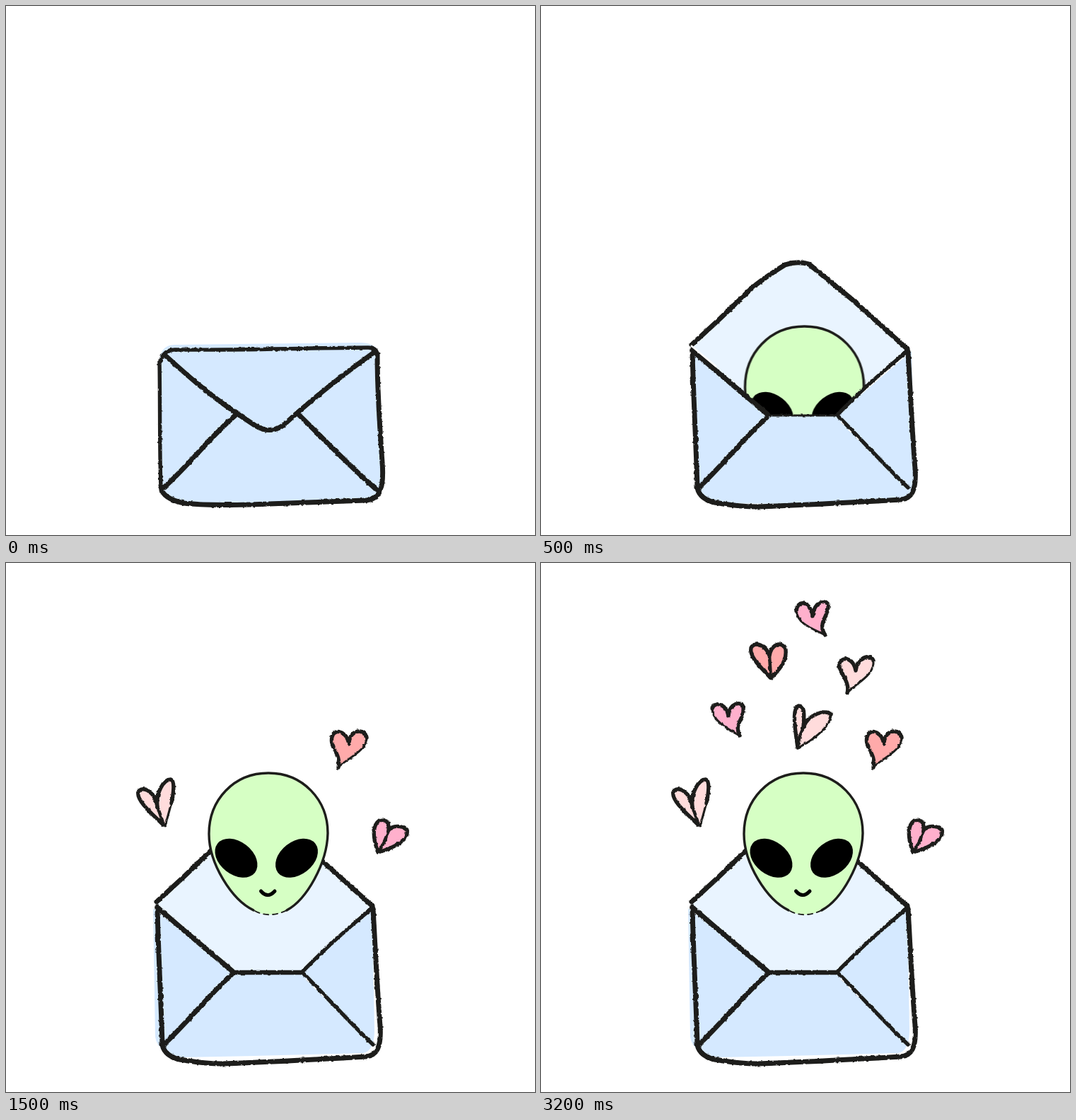
These frames come from a looping animation (748x748 px, 4 s). An HTML page:

```html
<!DOCTYPE html>
<html lang="en">
<head>
<meta charset="utf-8">
<title>Alien mail</title>
<style>
  html, body { margin: 0; width: 100%; height: 100%; overflow: hidden; background: #fff; }
  svg { display: block; width: 100vw; height: 100vh; }

  .ink, .outline { fill: none; stroke: #1d1d1b; stroke-width: 7; stroke-linecap: round; stroke-linejoin: round; }
  .ink { filter: url(#rough); }
  .outline { stroke-width: 3.4; }
  .mid { stroke-width: 5.4; }
  .paper { fill: #d5e9ff; }
  .inside { fill: #e9f4ff; }
  .skin { fill: #d6ffc4; }
  .chip { fill: none; stroke: #fff; }
  .rose { fill: #ffb0cc; }
  .coral { fill: #ffaaaa; }
  .blush { fill: #ffdcdc; }

  .closed, .open, .early, .late, .first, .rest, .alien, .lip { animation: 4s step-end infinite; }
  .closed { animation-name: closed; }
  .open { animation-name: open; }
  .early { animation-name: early; }
  .late, .first { animation-name: late; }
  .rest { animation-name: rest; }
  .alien { animation-name: rise; }
  .lip { animation-name: lip; }

  @keyframes closed { 0% { opacity: 1 } 12.5%, 100% { opacity: 0 } }
  @keyframes open { 0% { opacity: 0 } 12.5%, 100% { opacity: 1 } }
  @keyframes early { 0% { opacity: 1 } 37.5%, 100% { opacity: 0 } }
  @keyframes late { 0% { opacity: 0 } 37.5%, 100% { opacity: 1 } }
  @keyframes rest { 0% { opacity: 0 } 50%, 100% { opacity: 1 } }
  @keyframes rise {
    0% { transform: translate(1.5px, 156px) }
    25% { transform: translate(2.5px, 66px) }
    37.5%, 100% { transform: translate(0, 0) }
  }
  @keyframes lip { 0% { stroke-width: 3 } 25%, 100% { stroke-width: 6.5 } }
</style>
</head>
<body>
<svg viewBox="0 0 748 748">
  <defs>
    <filter id="rough" filterUnits="userSpaceOnUse" x="0" y="0" width="748" height="748" color-interpolation-filters="sRGB">
      <feTurbulence type="fractalNoise" baseFrequency=".2" numOctaves="2" seed="4"/>
      <feDisplacementMap in="SourceGraphic" scale="3" xChannelSelector="R" yChannelSelector="G"/>
    </filter>
    <clipPath id="mouth">
      <path d="M0 0H748V486H519L418 579H320L211 483H0Z"/>
    </clipPath>
  </defs>

  <g class="closed">
    <path class="paper" d="M217 502Q218 480 238 479L500 476Q520 476 525 487L531 672Q528 697 505 699L350 704L250 702Q224 692 221 680Z"/>
    <g class="ink">
      <path class="mid" d="M219 502Q222 487 238 486C330 487 400 484 512 483Q525 483 525 494"/>
      <path d="M525 492C525 540 528 590 532 645C535 684 528 698 508 699C430 702 380 704 345 705C310 706 270 705 252 703C232 699 221 691 219 681"/>
      <path class="mid" d="M217 502C218 560 217 630 219 681"/>
      <path d="M225 494C255 521 285 548 325 575L352 593Q373 606 392 593L412 575C450 542 485 515 520 490"/>
      <path d="M324 579C286 612 256 652 223 681M413 577C447 610 485 650 524 684"/>
    </g>
  </g>

  <g class="open">
    <path class="inside" d="M211 481L300 397L345 365Q362 360 380 365L519 486L418 579H320Z"/>
    <path class="ink" d="M213 479L250 445L300 397Q325 378 345 366Q362 360 379 365L402 384L440 415L518 485"/>

    <g clip-path="url(#mouth)">
      <g class="alien">
        <path class="skin" d="M371 297C420 297 455 335 455 382C454 425 425 476 395 492Q372 503 350 491C319 476 287 425 287 383C287 335 322 297 371 297Z"/>
        <g class="outline">
          <path d="M350 491C319 476 287 425 287 383C287 335 322 297 371 297C420 297 455 335 455 382C454 425 425 476 397 491"/>
          <path stroke-width="1.8" stroke-dasharray="7 6" d="M352 492Q372 503 397 491"/>
        </g>
        <ellipse rx="33.5" ry="23.2" transform="translate(325.5 417.3) rotate(38)"/>
        <ellipse rx="33.5" ry="23.2" transform="translate(411 417.3) rotate(-38)"/>
        <path d="M360.5 464Q370 475 380 464" fill="none" stroke="#000" stroke-width="5" stroke-linecap="round"/>
      </g>
    </g>

    <path class="paper early" d="M216 488L320 579H418L524 488L528 660Q530 695 508 698L350 704L255 703Q222 693 221 680Z"/>
    <path class="paper late" d="M208 488L320 579H418L518 487L521 660Q521 690 505 693L350 697L250 699Q215 695 211 670Z"/>

    <g class="ink">
      <path d="M214 486C215 545 219 610 221 681C223 692 233 701 252 703C270 706 285 708 305 708C370 706 440 702 508 698C524 697 531 685 529 655C524 590 522 540 519 489"/>
      <path d="M214 487L250 518L320 577"/>
      <path class="lip" d="M320 579H418"/>
      <path class="mid" d="M518 488C485 515 452 544 420 577"/>
      <path d="M319 582C285 613 256 650 223 681"/>
      <path class="mid" d="M421 581C452 612 486 650 519 681"/>
    </g>
    <path class="chip early" stroke-width="2.5" d="M212 480L248 510"/>
    <path class="chip" stroke-width="1.5" stroke-dasharray="6 9" d="M424 588L455 619"/>
  </g>

  <g class="first">
    <path class="blush" d="M224 372C208 356 184 336 187 324C192 314 210 322 214 344C212 326 222 306 233 306C243 310 234 348 224 372Z"/>
    <path class="coral" d="M469 290C474 268 457 262 461 246C464 234 480 236 485 247C490 234 508 234 510 247C510 266 482 276 469 290Z"/>
    <path class="rose" d="M526 409C520 392 516 372 528 364C538 361 542 368 541 378C546 371 560 370 567 378C570 390 552 402 526 409Z"/>
    <g class="ink mid">
      <path d="M222 370C208 356 184 336 187 324C192 314 210 322 214 344C212 326 222 306 233 306C239 308 237 325 234 339"/>
      <path stroke-width="3" d="M234 339L225 372"/>
      <path stroke-width="4.5" d="M214 344L223 370"/>
      <path d="M470 289C474 268 457 262 461 246C464 234 480 236 485 255C486 234 508 234 510 247"/>
      <path stroke-width="3" d="M510 247C510 266 482 276 470 289"/>
      <path d="M526 409C520 392 516 372 528 364C538 361 542 368 541 378C546 371 560 370 567 378C570 390 552 402 526 409"/>
      <path stroke-width="4.5" d="M541 378Q536 394 527 408"/>
    </g>
  </g>

  <g class="rest">
    <path class="rose" d="M402 103C382 92 362 86 361 66C362 52 380 52 384 74C386 54 404 50 406 60C407 76 390 84 402 103Z"/>
    <path class="coral" d="M326 164C314 150 294 134 297 120C302 110 318 116 323 131C326 114 340 110 346 122C348 142 334 152 326 164Z"/>
    <path class="blush" d="M432 185C438 166 418 152 422 142C428 130 442 136 445 150C448 132 466 128 470 138C472 160 444 170 432 185Z"/>
    <path class="rose" d="M281 245C262 234 242 222 242 206C246 194 262 200 265 214C266 198 284 194 286 204C288 222 272 226 281 245Z"/>
    <path class="blush" d="M363 262C360 240 354 206 364 202C374 202 372 216 371 232C378 214 402 206 410 214C410 232 382 252 363 262Z"/>
    <g class="ink mid">
      <path d="M361 68C362 52 380 52 384 75C386 54 404 50 406 60C407 76 390 84 402 102"/>
      <path stroke-width="3" d="M361 68C363 86 382 92 402 102"/>
      <path d="M325 163C314 150 294 134 297 120C302 110 318 116 323 131C326 114 340 110 346 122C348 142 334 152 326 163"/>
      <path stroke-width="4.5" d="M323 131L325 162"/>
      <path d="M433 184C438 166 418 152 422 142C428 130 442 136 445 152C448 132 466 128 470 138"/>
      <path stroke-width="3" d="M470 138C472 160 444 170 433 184"/>
      <path d="M242 206C246 194 262 200 265 216C266 198 284 194 286 204C288 222 272 226 281 244"/>
      <path stroke-width="3" d="M242 206C242 222 262 234 281 244"/>
      <path d="M363 261C360 240 354 206 364 202C374 202 372 216 371 232C378 214 402 206 410 214"/>
      <path stroke-width="3" d="M410 214C410 232 382 252 364 261"/>
      <path stroke-width="4.5" d="M371 232Q364 246 363 261"/>
    </g>
  </g>
</svg>
</body>
</html>
```
